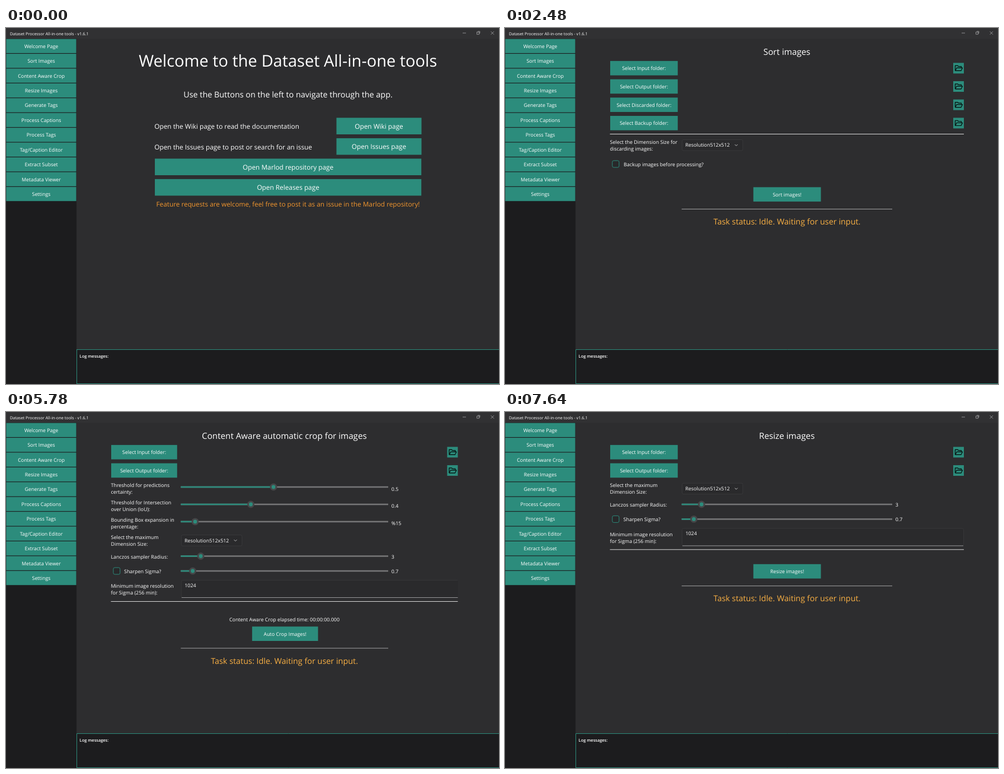
Write an HTML page with a canvas that moves like this. It is 881x636 px and loops after 8000 ms.

```html
<!DOCTYPE html>
<html lang="en">
<head>
<meta charset="utf-8">
<title>Dataset tools</title>
<style>
  html, body { margin: 0; width: 100%; height: 100%; overflow: hidden; background: #2d2d2f; }
  canvas { display: block; }
</style>
</head>
<body>
<canvas id="stage" width="881" height="636"></canvas>
<script>
const ctx = document.getElementById('stage').getContext('2d');
const TEAL = '#2c8c7c', DARK = '#1c1c1e', PANEL = '#2d2d2f', AMBER = '#f9b044';
const LOOP = 8000;
const BODY = 8.92, LARGE = 11.82;

function text(str, x, y, { size = BODY, color = '#fff', align = 'left', weight = 400 } = {}) {
  ctx.font = `${weight} ${size}px "Open Sans", sans-serif`;
  ctx.fillStyle = color;
  ctx.textAlign = align;
  ctx.fillText(str, x, y + size * 0.37);
}

function centered(str, x, y, size, color) {
  text(str, x, y, { size, color, align: 'center' });
}

function rect(x, y, w, h, color) {
  ctx.fillStyle = color;
  ctx.fillRect(x, y, w, h);
}

function lines(points, color, width = 1) {
  ctx.beginPath();
  points.forEach(([x, y]) => ctx.lineTo(x, y));
  ctx.strokeStyle = color;
  ctx.lineWidth = width;
  ctx.stroke();
}

function box(x, y, w, h, radius, fill, stroke) {
  ctx.beginPath();
  ctx.roundRect(x, y, w, h, radius);
  ctx.fillStyle = fill;
  ctx.fill();
  ctx.strokeStyle = stroke;
  ctx.lineWidth = 1;
  ctx.stroke();
}

function disc(x, y, r, color) {
  ctx.beginPath();
  ctx.arc(x, y, r, 0, Math.PI * 2);
  ctx.fillStyle = color;
  ctx.fill();
}

function button(label, x, y, w, h = 25.7, size = BODY) {
  rect(x, y, w, h, TEAL);
  centered(label, x + w / 2, y + h / 2 + 0.2, size);
}

function folderIcon(x, y) {
  rect(x, y, 19, 19, TEAL);
  ctx.lineJoin = 'round';
  lines([[x + 3.5, y + 14], [x + 3.5, y + 5], [x + 8, y + 5], [x + 9.5, y + 6.5],
         [x + 14.5, y + 6.5], [x + 14.5, y + 8.8]], '#081a17', 1.4);
  lines([[x + 3.5, y + 14], [x + 6.2, y + 9], [x + 16.5, y + 9],
         [x + 14, y + 14], [x + 3.5, y + 14]], '#081a17', 1.4);
}

function folderRows(names, buttonWidth, right) {
  names.forEach((name, i) => {
    const y = 58.9 + i * 32.7;
    button(`Select ${name} folder:`, 188, y, buttonWidth);
    folderIcon(right - 19, y + 3.4);
  });
}

function label(y, ...rows) {
  rows.forEach((row, i) => text(row, 187.5, y + i * 12.1));
}

function combo(x, y) {
  box(x + 0.5, y - 9.5, 108.5, 19.5, 2.5, '#2a2a2c', '#39393b');
  text('Resolution512x512', x + 6.3, y);
  lines([[x + 94.7, y - 1], [x + 97.2, y + 1.5], [x + 99.7, y - 1]], '#ccc', 0.9);
}

function checkbox(y, str, x) {
  box(191.8, y - 6, 12, 12, 2.5, '#28282a', TEAL);
  text(str, x, y + 0.5);
}

function slider(x, right, y, knob, value, valueY) {
  rect(x, y - 1.3, right - x, 2.6, '#767677');
  rect(x, y - 1.3, knob - x, 2.6, TEAL);
  disc(knob, y, 6.4, '#464648');
  disc(knob, y, 3.4, TEAL);
  text(value, right + 5.8, valueY);
}

function entry(x, right, y) {
  box(x + 0.5, y + 0.5, right - x - 1, 31, 2.5, '#2a2a2c', '#363638');
  rect(x + 1, y + 31, right - x - 2, 1, '#98989a');
  text('1024', x + 6.4, y + 9.6);
}

function divider(x, right, y, color = '#dcdcdc') {
  rect(x, y, right - x, 1, color);
}

function taskStatus(center, y) {
  centered('Task status: Idle. Waiting for user input.', center, y, 14.4, AMBER);
}

function welcomePage() {
  centered('Welcome to the Dataset All-in-one tools', 503.8, 58.6, 29);
  centered('Use the Buttons on the left to navigate through the app.', 504, 118.5, 14.37);
  text('Open the Wiki page to read the documentation', 265.3, 175.7, { size: LARGE });
  text('Open the Issues page to post or search for an issue', 265.3, 212.2, { size: LARGE });
  button('Open Wiki page', 590.5, 160.4, 152, 29.6, LARGE);
  button('Open Issues page', 590.5, 196.9, 152, 29.6, LARGE);
  button('Open Marlod repository page', 266, 233.4, 476.2, 29.6, LARGE);
  button('Open Releases page', 266, 269.9, 476.2, 29.6, LARGE);
  centered('Feature requests are welcome, feel free to post it as an issue in the Marlod repository!',
    504, 315, 11.8, '#f2962e');
}

function sortPage() {
  centered('Sort images', 503.7, 42.5, 15.25);
  folderRows(['Input', 'Output', 'Discarded', 'Backup'], 120.7, 820);
  divider(187.5, 820, 189);
  label(203.2, 'Select the Dimension Size for', 'discarding images:');
  combo(316, 209);
  checkbox(243, 'Backup images before processing?', 212);
  button('Sort images!', 443.8, 284.4, 120.7);
  divider(315.7, 692, 323, '#a4a4a5');
  taskStatus(504, 345.3);
}

function cropPage() {
  centered('Content Aware automatic crop for images', 497.4, 42.5, 15.2);
  folderRows(['Input', 'Output'], 117.8, 807.4);
  label(131, 'Threshold for predictions', 'certainty:');
  slider(312.4, 683, 134, 478, '0.5', 137.2);
  label(161.9, 'Threshold for Intersection', 'over Union (IoU):');
  slider(312.4, 683, 165, 437.5, '0.4', 168);
  label(192.8, 'Bounding Box expansion in', 'percentage:');
  slider(312.4, 683, 195.9, 338, '%15', 199);
  label(223.6, 'Select the maximum', 'Dimension Size:');
  combo(312.8, 229.2);
  label(258.2, 'Lanczos sampler Radius:');
  slider(312.4, 683, 257.5, 348, '3', 258.2);
  checkbox(284, 'Sharpen Sigma?', 211);
  slider(312.4, 683, 284, 333.6, '0.7', 284.7);
  label(311, 'Minimum image resolution', 'for Sigma (256 min):');
  ctx.save();
  ctx.beginPath();
  ctx.rect(188, 290, 619.4, 50);
  ctx.clip();
  entry(312.8, 816, 300);
  ctx.restore();
  divider(187.5, 807.4, 338);
  centered('Content Aware Crop elapsed time: 00:00:00.000', 497.5, 371, BODY);
  button('Auto Crop Images!', 439.8, 383.3, 117.8);
  divider(312.4, 683, 421.5, '#a4a4a5');
  taskStatus(497.6, 444.2);
}

function resizePage() {
  centered('Resize images', 503.7, 42.5, 15.25);
  folderRows(['Input', 'Output'], 120.7, 820);
  label(131, 'Select the maximum', 'Dimension Size:');
  combo(316, 136.7);
  label(165.6, 'Lanczos sampler Radius:');
  slider(315.7, 692, 165, 351.2, '3', 165.6);
  checkbox(191.4, 'Sharpen Sigma?', 211.6);
  slider(315.7, 692, 191.4, 337.4, '0.7', 192);
  label(218.4, 'Minimum image resolution', 'for Sigma (256 min):');
  entry(316, 820, 207.5);
  divider(187.5, 820, 245.3);
  button('Resize images!', 443.8, 271.8, 120.7);
  divider(315.7, 692, 310.2, '#a4a4a5');
  taskStatus(504, 332.8);
}

function windowFrame() {
  rect(0, 0, 881, 636, PANEL);
  rect(0, 0, 881, 19, '#313133');
  text('Dataset Processor All-in-one tools - v1.6.1', 7, 9.8, { size: 7.3 });
  const grey = '#a8a8aa';
  lines([[816, 9], [822, 9]], grey, 0.8);
  ctx.lineWidth = 0.8;
  ctx.strokeRect(841.5, 7.2, 4, 4);
  lines([[843, 6], [846.8, 6], [846.8, 9.8]], grey, 0.8);
  lines([[866.5, 6.2], [872, 11.7]], grey, 0.8);
  lines([[872, 6.2], [866.5, 11.7]], grey, 0.8);

  rect(0, 19, 126, 617, DARK);
  ['Welcome Page', 'Sort Images', 'Content Aware Crop', 'Resize Images', 'Generate Tags',
   'Process Captions', 'Process Tags', 'Tag/Caption Editor', 'Extract Subset',
   'Metadata Viewer', 'Settings'
  ].forEach((name, i) => button(name, 0.5, 19.6 + i * 26.43, 125, 25.3));

  rect(126, 574, 755, 62, DARK);
  ctx.strokeStyle = TEAL;
  ctx.lineWidth = 1;
  ctx.strokeRect(126.5, 574.5, 760, 61);
  text('Log messages:', 131.6, 586, { size: 7.45, weight: 600 });
}

const pages = [[7100, resizePage], [3800, cropPage], [500, sortPage], [0, welcomePage]];

function draw(now) {
  const time = now % LOOP;
  ctx.textRendering = 'geometricPrecision';
  windowFrame();
  pages.find(([start]) => time >= start)[1]();
  requestAnimationFrame(draw);
}

draw(performance.now());
</script>
</body>
</html>
```
